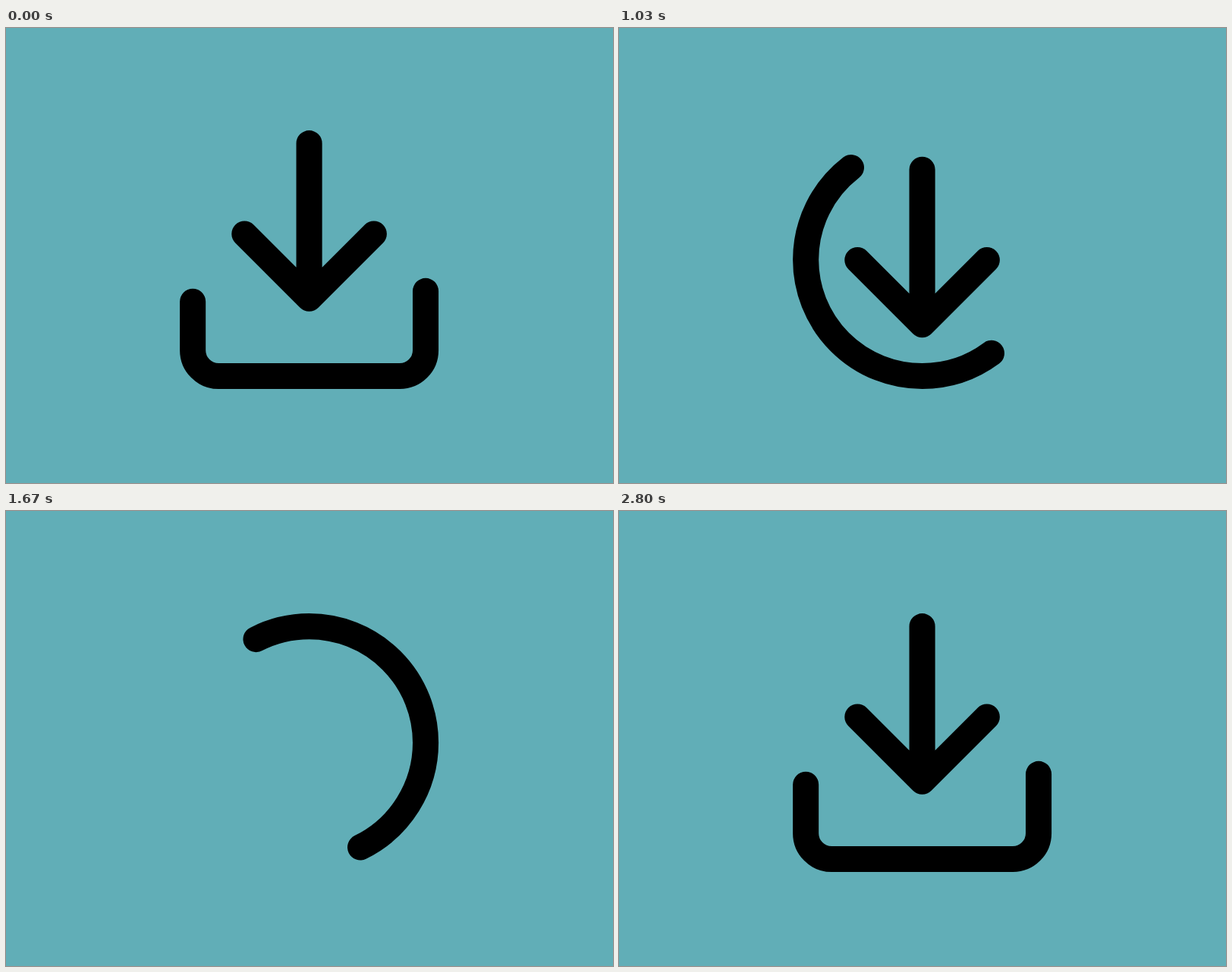
An HTML page for the animation above (3010 ms loop, 800x600 px).

```html
<!DOCTYPE html>
<html lang="en">
<head>
<meta charset="utf-8">
<title>Download</title>
<style>
  html, body { margin: 0; width: 100%; height: 100%; overflow: hidden; background: #61aeb7; }
  svg {
    position: absolute; left: 194.9px; top: 100.9px; width: 409.2px; height: 409.2px;
    overflow: hidden; fill: none; stroke: #000; stroke-width: 2;
    stroke-linecap: round; stroke-linejoin: round;
  }
</style>
</head>
<body>
<svg viewBox="0 0 24 24">
  <path id="tray" pathLength="1"/>
  <path id="arrow" d="M12 3V15M7 10L12 15L17 10"/>
</svg>
<script>
const LOOP = 3010, TICK = 100 / 3;
const tray = document.getElementById('tray');
const arrow = document.getElementById('arrow');

const mix = (a, b, p) => a + (b - a) * p;

// Cubic ease in and out between two ticks
function ease(t, from, to) {
  const x = Math.min(1, Math.max(0, (t - from) / (to - from)));
  return x < .5 ? 4 * x ** 3 : 1 - 4 * (1 - x) ** 3;
}

// [tick, degrees]: three turns at a nearly even speed
const turns = [[29, 0], [31, 53.8], [38, 262.3], [50, 604.3], [66.5, 1080]];

function spin(t) {
  if (t <= turns[0][0]) return 0;
  for (let i = 1; i < turns.length; i++) {
    const [t0, a0] = turns[i - 1], [t1, a1] = turns[i];
    if (t < t1) return mix(a0, a1, (t - t0) / (t1 - t0));
  }
  return 1080;
}

// Rounded square, clockwise from the upper end of its right side
function roundedSquare(r) {
  const s = 18 - 2 * r, arc = `a${r} ${r} 0 0 1 `;
  return `M21 ${3 + r}v${s}${arc}${-r} ${r}h${-s}${arc}${-r} ${-r}` +
         `v${-s}${arc}${r} ${-r}h${s}${arc}${r} ${r}`;
}

function arrowShift(t, open, close) {
  if (t < 30) return 2 * open;
  if (t < 55) return mix(2, 24, ease(t, 30, 45.1));
  return mix(-17.27, 0, close);
}

function draw(t) {
  const open = ease(t, 5.7, 30);
  const close = ease(t, 67.5, 80);
  const round = open - close;
  const start = mix(.14, 0, round), end = mix(.565, .5, round);
  const length = end - start;
  const offset = (start + spin(t) / 360) % 1;

  tray.setAttribute('d', roundedSquare(mix(2, 9, round)));
  tray.setAttribute('stroke-dasharray', `${length} ${1 - length}`);
  tray.setAttribute('stroke-dashoffset', 1 - offset);
  arrow.setAttribute('transform', `translate(0 ${arrowShift(t, open, close)})`);
}

function frame() {
  const ms = performance.now() % LOOP;
  draw(Math.min(89, Math.floor((ms + 3.4) / TICK)));
  requestAnimationFrame(frame);
}
frame();
</script>
</body>
</html>
```
